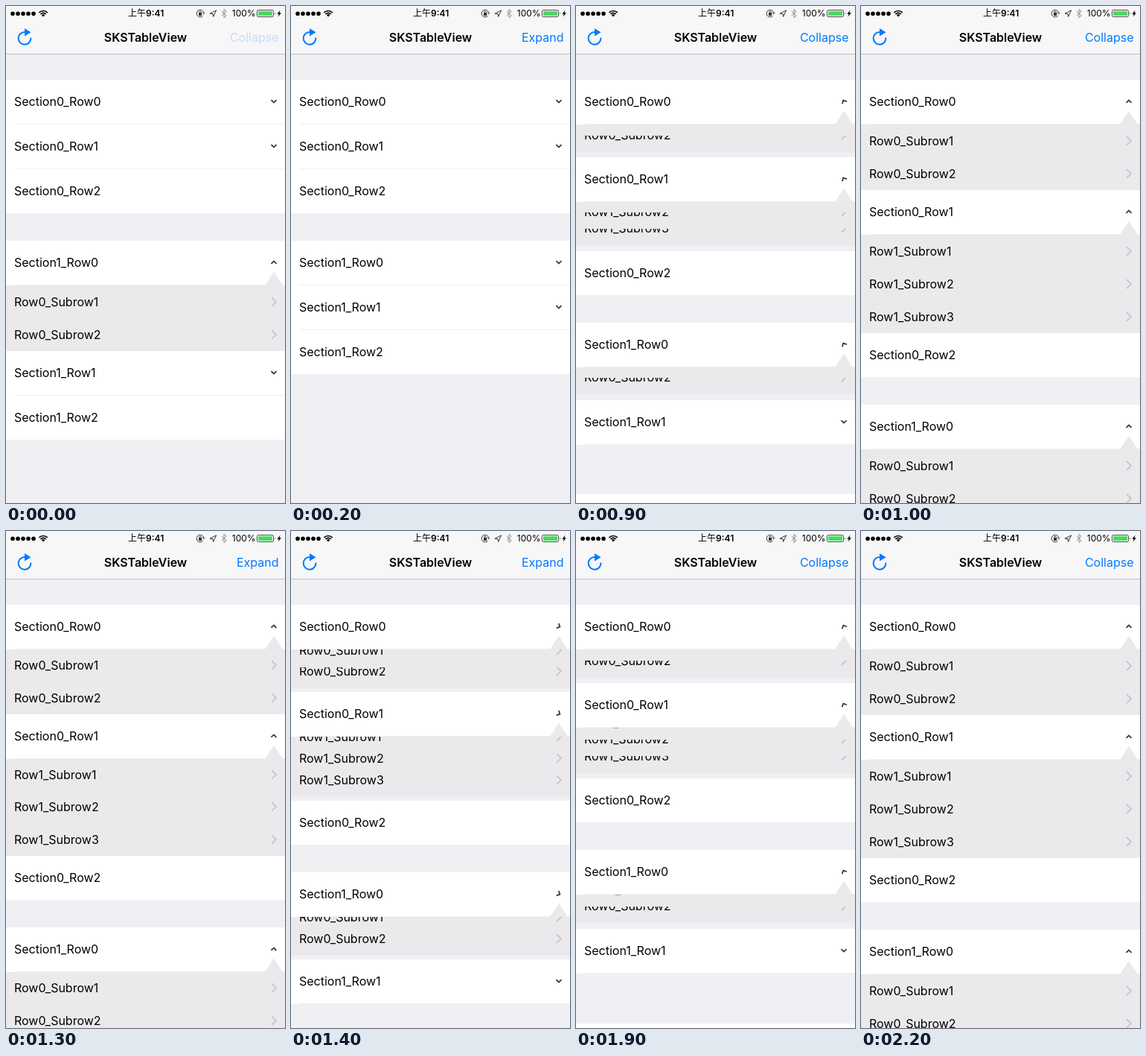
Recreate the animation shown at these times as an HTML page. Size 375 by 667 pixels, loop 2400 ms.

```html
<!DOCTYPE html>
<html lang="en">
<head>
<meta charset="utf-8">
<title>Expandable table</title>
<style>
  html, body { margin: 0; width: 100%; height: 100%; overflow: hidden; background: #efeff4; }
  svg { display: block; width: 375px; height: 667px; font: 16px Inter, "Noto Sans CJK SC", "Noto Sans CJK", sans-serif; }
  rect { shape-rendering: crispEdges; }
  .line { fill: none; stroke-linecap: butt; stroke-linejoin: miter; }
</style>
</head>
<body>
<svg id="stage" viewBox="0 0 375 667">
  <rect width="375" height="667" fill="#efeff4"/>
  <g id="subs"></g>
  <g id="rows"></g>

  <rect width="375" height="64" fill="#f7f7f8"/>
  <rect y="64" width="375" height="1" fill="#bfbfc3"/>
  <text x="187.5" y="48" text-anchor="middle" font-weight="600">SKSTableView</text>
  <text id="action" x="366.5" y="48" text-anchor="end" fill="#007aff"></text>
  <path class="line" d="M33.4 42.5A8.4 8.4 0 1 1 25 34.9" stroke="#007aff" stroke-width="2"/>
  <path d="M25 30L33.5 35.2L25 40.5Z" fill="#007aff"/>

  <g id="signal"></g>
  <g class="line" stroke="#000" stroke-width="1.7">
    <path d="M44.4 8.8A8.2 8.2 0 0 1 55.8 8.8M46.4 11A5.2 5.2 0 0 1 53.8 11"/>
  </g>
  <path d="M47.9 12.2A3.1 3.1 0 0 1 52.3 12.2L50.1 14.6Z"/>
  <text x="188.2" y="14.4" font-size="12" text-anchor="middle"><tspan font-weight="500">上午</tspan><tspan font-weight="600">9:41</tspan></text>

  <g class="line" stroke="#333" stroke-width="1">
    <path d="M264.6 13.2A4.8 4.8 0 1 1 265.7 9.2M263.7 9L265.7 10.8L267.3 8.8"/>
    <path d="M259.6 9.6V8.6A1.4 1.4 0 0 1 262.4 8.6V9.6"/>
    <path d="M274 10.2L282.6 5.8L278.6 14.4L278 10.6Z"/>
    <path d="M289.8 7L296.2 12.8L293 15.8V4.2L296.2 7.2L289.8 13" stroke="#8e8e93"/>
  </g>
  <rect x="258.7" y="9.4" width="4.6" height="3.4" fill="#333"/>
  <text x="303.8" y="14.4" font-size="12">100%</text>
  <rect x="337.5" y="5.5" width="22" height="9" rx="1.8" fill="#fff" stroke="#333" stroke-width=".9" style="shape-rendering:auto"/>
  <rect x="339" y="7" width="19" height="6" fill="#4cd964"/>
  <path d="M361 8.5Q362.6 10 361 11.7Z" fill="#333"/>
  <path d="M368.6 5.6L364.4 10.8H366.8L365.6 14.6L370 9.2H367.5Z"/>
</svg>
<script>
const LOOP = 2400, STEP = 100;
const ROW = 59.8, SUB = 44.05, GAP = 36.4, TOP = 99.2;
const SUB_GRAY = "#ebe9ec";

// listed: subrows that take up room; drawn: subrows that are ever on screen
const sections = [
  [{ listed: 2, drawn: 2 }, { listed: 3, drawn: 3 }, { listed: 0, drawn: 0 }],
  [{ listed: 2, drawn: 2, first: true }, { listed: 3, drawn: 0 }, { listed: 0, drawn: 0 }]
];

const moves = [
  { start: 0, duration: 200, opening: false, all: false },
  { start: 800, duration: 200, opening: true, all: true },
  { start: 1280, duration: 300, opening: false, all: true },
  { start: 1747, duration: 300, opening: true, all: true }
];

const $ = id => document.getElementById(id);

function add(parent, tag, attrs, text) {
  const node = document.createElementNS("http://www.w3.org/2000/svg", tag);
  for (const key in attrs) node.setAttribute(key, attrs[key]);
  if (text) node.textContent = text;
  return parent.appendChild(node);
}

const place = (node, y) => node.setAttribute("transform", `translate(0 ${Math.round(y)})`);
const show = (node, on) => node.setAttribute("display", on ? "inline" : "none");

function ease(u) {
  u = Math.min(1, Math.max(0, u));
  return u * u * (3 - 2 * u);
}

function buildRow(row, s, i) {
  row.node = add($("rows"), "g");
  add(row.node, "rect", { width: 375, height: row.listed ? 60 : 59, fill: "#fff" });
  add(row.node, "text", { x: 11, y: 35 }, `Section${s}_Row${i}`);
  if (row.listed) {
    add(row.node, "rect", { x: 11, y: 59, width: 364, height: 1, fill: "#f0f0f3" });
    row.pointer = add(row.node, "path", { d: "M348 60L360 41.5L372 60Z", fill: SUB_GRAY });
    row.chevron = add(row.node, "path", {
      class: "line", d: "M-3.5 1.9L0 -1.6L3.5 1.9", stroke: "#34344a", "stroke-width": 1.8
    });
  }
  row.subs = [];
  for (let k = row.drawn; k >= 1; k--) {
    const sub = row.subs[k - 1] = add($("subs"), "g");
    add(sub, "rect", { y: -22, width: 375, height: 45, fill: SUB_GRAY });
    add(sub, "text", { x: 11, y: 5.5 }, `Row${i}_Subrow${k}`);
    add(sub, "path", { class: "line", d: "M357 -6L363 0L357 6", stroke: "#c7c7cc", "stroke-width": 1.8 });
  }
}

function updateRow(row, y, move, u) {
  const active = row.listed && (move.all || row.first);
  const moved = ease(u);
  const open = active ? (move.opening ? moved : 1 - moved) : 0;
  place(row.node, y);
  if (row.listed) {
    const turning = active && row.drawn;
    const angle = turning ? 180 * ease(u * 1.5) + (move.opening ? 180 : 0) : 180;
    row.chevron.setAttribute("transform", `translate(360 29) rotate(${angle})`);
    show(row.pointer, turning && (move.opening || u < 1));
  }
  row.subs.forEach((sub, k) => {
    show(sub, open > 0.01);
    place(sub, y + 29.8 - 9 + open * (61 + SUB * k));
  });
  return y + ROW + open * row.listed * SUB;
}

function render(time) {
  const t = Math.floor((time % LOOP) / STEP) * STEP;
  const move = moves.filter(m => m.start <= t).pop();
  const u = Math.min(1, (t - move.start) / move.duration);

  let y = TOP;
  for (const rows of sections) {
    for (const row of rows) y = updateRow(row, y, move, u);
    y += GAP;
  }

  const pressed = t === 0 || t === 1200;
  $("action").textContent = move.opening || pressed ? "Collapse" : "Expand";
  $("action").setAttribute("fill-opacity", pressed ? 0.2 : 1);
}

for (let i = 0; i < 5; i++) add($("signal"), "circle", { cx: 9 + 7 * i, cy: 10.2, r: 2.8 });
sections.forEach((rows, s) => rows.forEach((row, i) => buildRow(row, s, i)));

let origin;
function tick(now) {
  origin ??= now;
  render(now - origin);
  requestAnimationFrame(tick);
}
render(0);
requestAnimationFrame(tick);
</script>
</body>
</html>
```
